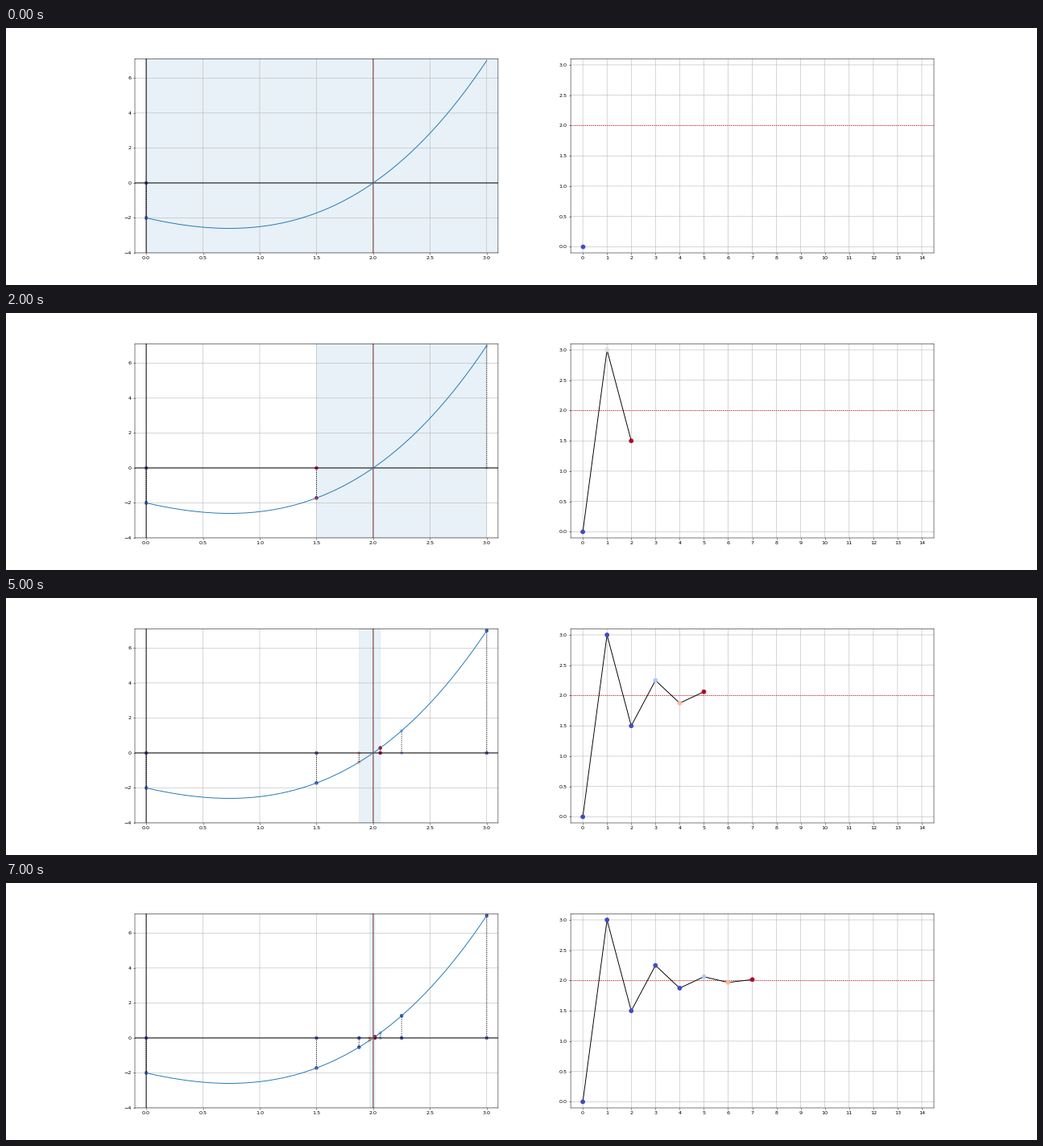
A matplotlib script for the animation above (8000 ms loop, 1280 px wide and 320 px high).

```python
import numpy as np
import matplotlib.pyplot as plt
from matplotlib.animation import FuncAnimation

STEPS = 8
ROOT = 2

plt.rcParams["path.snap"] = False  # soft, subpixel line positions


def f(x):
    return (x**3 + 3 * x**2 - 6 * x - 8) / 4


# Bisection iterates: each one halves the distance to the root and switches side
steps = np.arange(STEPS)
xs = ROOT - 2 * (-0.5) ** steps

fig, (left, right) = plt.subplots(1, 2, figsize=(28, 7), dpi=1280 / 28)
fig.subplots_adjust(left=0.125, right=0.9, bottom=0.125, top=0.88, wspace=0.2)


def add_dots(ax, size, zorder):
    return ax.scatter([0], [0], c=[0.0], s=size, cmap="coolwarm", zorder=zorder)


# Function with the current search interval
grid_x = np.linspace(0, 3, 200)
left.grid()
span = left.axvspan(0, 3.2, color="C0", alpha=0.1)
left_dots = add_dots(left, 36, 1)
left.axhline(0, color="black")
left.axvline(0, color="black")
left.axvline(ROOT, color="#7a2a30")
left.plot(grid_x, f(grid_x), color="C0")
drops = left.vlines([], [], [], color="black", linestyle=":", linewidth=1.5)
left.set(xlim=(-0.1, 3.1), ylim=(-4, 7.1))

# Iterates against step number
right.grid()
right.axhline(ROOT, color="red", linestyle=":")
path, = right.plot([], [], color="black")
right_dots = add_dots(right, 64, 3)
right.set(xlim=(-0.5, 14.5), ylim=(-0.1, 3.1), xticks=range(15))


def paint(dots, points, ages, oldest, newest):
    dots.set_offsets(points)
    dots.set_array(ages)
    dots.set_clim(oldest, newest)


def update(k):
    x, n = xs[:k + 1], steps[:k + 1]
    y = f(x)
    # Only the last few iterates stand out from blue
    oldest, newest = max(0, k - 3), max(1, k)

    low, high = sorted(xs[k - 1:k + 1]) if k else (0, 3.2)
    span.set_x(low)
    span.set_width(high - low)

    points = np.column_stack([np.r_[x, x], np.r_[0 * x, y]])
    paint(left_dots, points, np.r_[n, n].astype(float), oldest, newest)
    drops.set_segments([[(a, 0), (a, b)] for a, b in zip(x, y)])

    path.set_data(n, x)
    paint(right_dots, np.column_stack([n, x]), n.astype(float), oldest, newest)
    return span, left_dots, drops, path, right_dots


anim = FuncAnimation(fig, update, frames=STEPS, interval=1000,
                     repeat=True, repeat_delay=0, blit=False)
plt.show()
```
